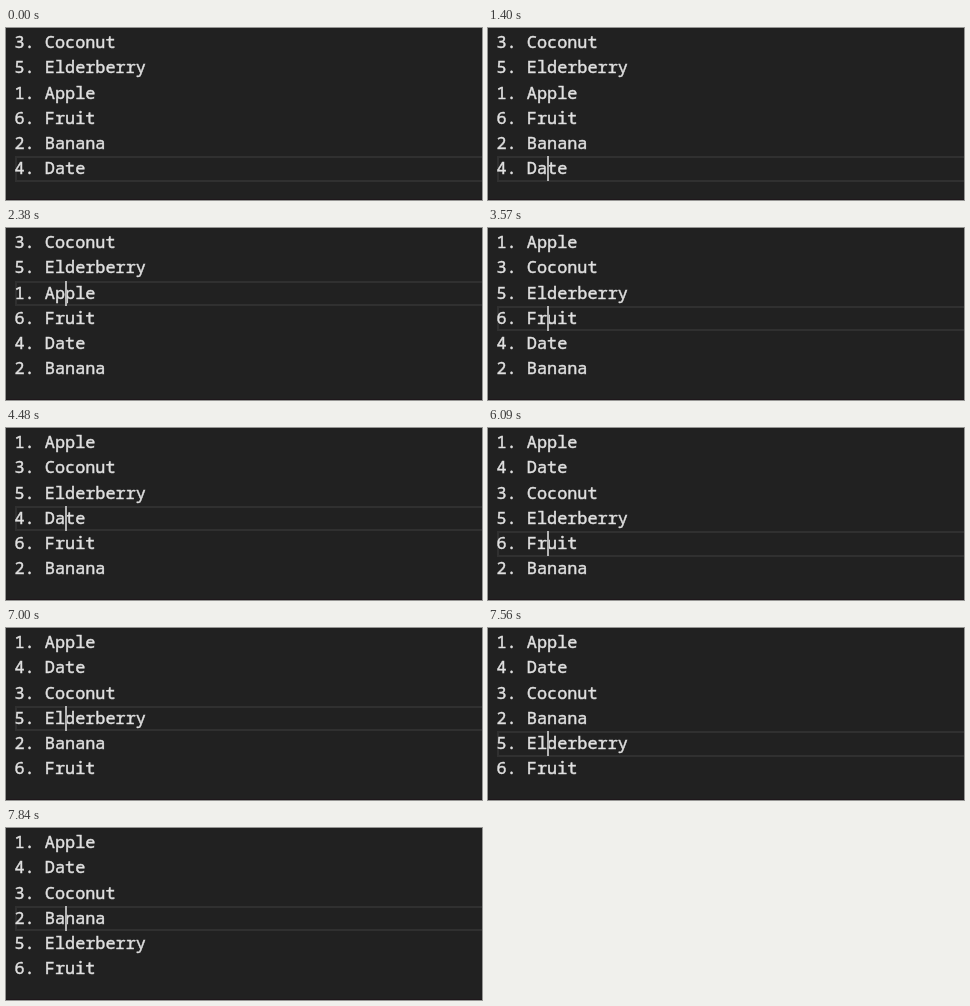
Animation of 476x172 px, one loop 8 s. Source, as an HTML page:

```html
<!DOCTYPE html>
<html lang="en">
<head>
<meta charset="utf-8">
<title>Sorting lines</title>
<style>
  html, body { margin: 0; width: 100%; height: 100%; overflow: hidden; background: #212121; }
  svg { display: block; width: 476px; height: 172px; }
  text {
    font: 16.85px "Noto Sans Mono", "DejaVu Sans Mono", monospace;
    fill: #e0e0e0; stroke: #e0e0e0; stroke-width: 0.45px; white-space: pre;
  }
</style>
</head>
<body>
<svg viewBox="0 0 476 172">
  <rect width="476" height="172" fill="#212121"/>
  <rect y="171" width="476" height="1" fill="#1e171b"/>
  <rect id="active" x="10" width="480" fill="none" stroke="#303030" stroke-width="2"/>
  <g id="lines"></g>
  <rect id="caret" x="59" width="2" height="25" fill="#b4b4b4"/>
</svg>
<script>
const LOOP = 8000, PITCH = 25.2, LEFT = 8.5;
const START = ["3. Coconut", "5. Elderberry", "1. Apple", "6. Fruit", "2. Banana", "4. Date"];

// up/down move the caret, lift/drop carry its line along
const KEYS = [
  [350, "show"], [910, "hide"], [1400, "show"],
  [1960, "lift"], [2240, "up"], [2380, "up"],
  [2800, "lift"], [3010, "lift"], [3220, "down"], [3430, "down"], [3570, "down"],
  [4060, "hide"], [4200, "drop"], [4480, "up"],
  [4900, "hide"], [5040, "lift"], [5320, "up"],
  [5600, "drop"], [5880, "down"], [6090, "down"],
  [6510, "drop"], [6720, "up"], [7000, "up"],
  [7350, "drop"], [7630, "up"]
];
const STEP = { up: -1, lift: -1, down: 1, drop: 1 };

const byId = id => document.getElementById(id);
const active = byId("active"), caret = byId("caret");
const rowY = (row, offset) => Math.round(offset + row * PITCH);

const rows = START.map((_, i) => {
  const row = document.createElementNS("http://www.w3.org/2000/svg", "text");
  row.setAttribute("x", LEFT);
  row.setAttribute("y", 20.2 + i * PITCH);
  byId("lines").append(row);
  return row;
});

function stateAt(t) {
  const lines = START.slice();
  let row = 5, shown = false;
  for (const [time, key] of KEYS) {
    if (time > t) break;
    shown = key !== "hide";
    const next = row + (STEP[key] || 0);
    if (key === "lift" || key === "drop") {
      [lines[row], lines[next]] = [lines[next], lines[row]];
    }
    row = next;
  }
  return { lines, row, shown };
}

function draw(t) {
  const { lines, row, shown } = stateAt(t);
  rows.forEach((el, i) => {
    if (el.textContent !== lines[i]) el.textContent = lines[i];
  });
  const top = rowY(row, 3.2);
  active.setAttribute("y", top);
  active.setAttribute("height", rowY(row, 26.8) - top);
  caret.setAttribute("y", rowY(row, 2.25));
  caret.setAttribute("visibility", shown ? "visible" : "hidden");
}

const begin = performance.now();
function tick() {
  draw((performance.now() - begin) % LOOP);
  requestAnimationFrame(tick);
}
draw(0);
requestAnimationFrame(tick);
</script>
</body>
</html>
```
